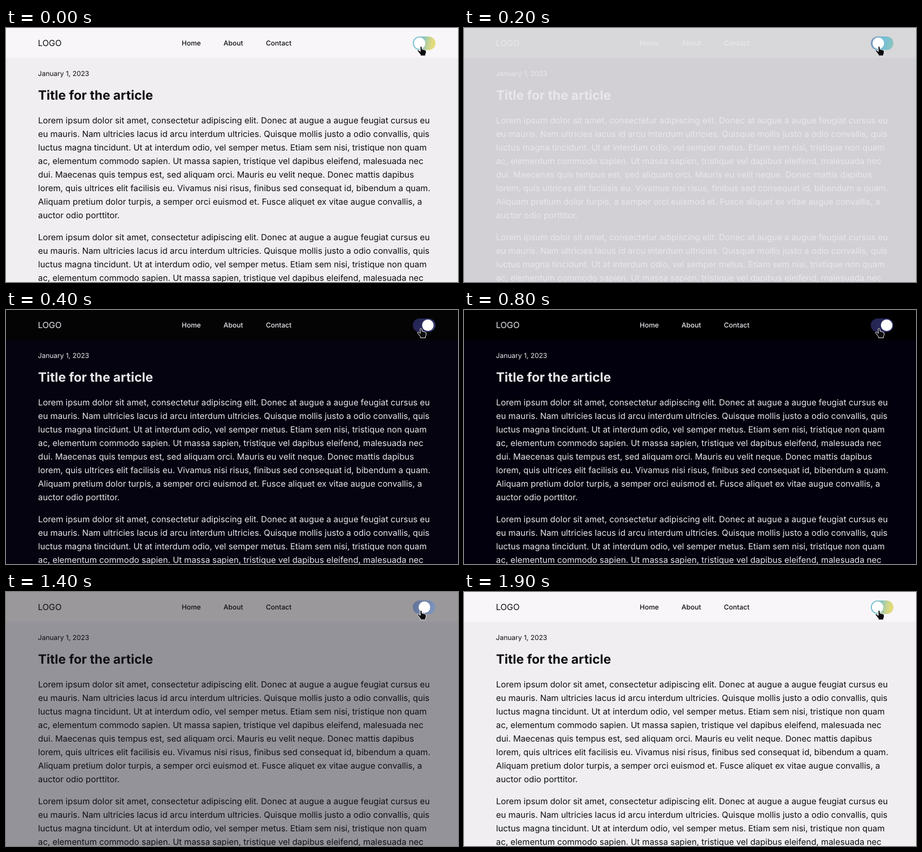
Write an HTML page that moves like this. It is 800 px wide and 450 px high and loops after 2000 ms.

```html
<!DOCTYPE html>
<html lang="en">
<head>
<meta charset="utf-8">
<title>Theme switch</title>
<style>
  html, body { margin: 0; width: 100%; height: 100%; overflow: hidden; }
  svg { display: block; width: 800px; height: 450px; }
  text {
    font: 14.96px Inter, sans-serif;
    font-optical-sizing: none;
    text-rendering: geometricPrecision;
    white-space: pre;
  }
  .small { font-size: 12px; }
  .nav { font-size: 12px; font-weight: 500; }
  .title { font-size: 22.7px; font-weight: 700; }
</style>
</head>
<body>
<svg viewBox="0 0 800 450">
  <defs>
    <linearGradient id="sky" gradientUnits="userSpaceOnUse" x1="0" y1="0" x2="196" y2="40">
      <stop offset="0" stop-color="#23244f"/>
      <stop offset=".17" stop-color="#2a2b62"/>
      <stop offset=".26" stop-color="#414b76"/>
      <stop offset=".38" stop-color="#505f80"/>
      <stop offset=".69" stop-color="#7f95bd"/>
      <stop offset=".79" stop-color="#70bed8"/>
      <stop offset=".88" stop-color="#86c4c2"/>
      <stop offset=".93" stop-color="#c6d491"/>
      <stop offset=".97" stop-color="#e2db79"/>
    </linearGradient>
    <clipPath id="pill"><rect x="720" y="15" width="40" height="24" rx="12"/></clipPath>
  </defs>

  <rect id="page" width="800" height="450"/>
  <rect id="header" width="800" height="53"/>

  <g id="copy">
    <text x="56.4" y="32">LOGO</text>
    <text class="nav" x="311" y="31">Home</text>
    <text class="nav" x="385" y="31">About</text>
    <text class="nav" x="460" y="31">Contact</text>
    <text class="small" x="56.6" y="84.5">January 1, 2023</text>
    <text class="title" x="56.7" y="127.4">Title for the article</text>
  </g>

  <g clip-path="url(#pill)">
    <rect id="strip" width="200" height="24" fill="url(#sky)"/>
  </g>
  <circle id="knob" cy="27" r="10.2" fill="#fff"/>

  <path fill="#0c0c0e" stroke="#f4f4f6" stroke-linejoin="round"
    d="M733 34.2Q733 32.6 734.4 32.6Q735.8 32.6 736 34.2L736.6 38
       Q738 37 739 38.6Q740.6 37.8 741.4 39.4Q743.4 38.8 743.6 41
       L743.5 44.2Q743 46 742.4 47V49.2H733.6V47.2Q731.4 45 730.4 43
       L728.4 40.8Q727.8 39.2 729.4 39Q731 39.2 732.4 41L733.4 41.4Z"/>
</svg>

<script>
  const LOOP = 2000, STEP = 100;
  const TO_DARK = 167, TO_LIGHT = 1301;
  const FADE = 276, SLIDE = 360;

  const light = { page: [240, 238, 241], header: [248, 246, 249] };
  const dark = { page: [1, 0, 12], header: [0, 0, 1] };

  const lines = [
    "Lorem ipsum dolor sit amet, consectetur adipiscing elit. Donec at augue a augue feugiat cursus eu",
    "eu mauris. Nam ultricies lacus id arcu interdum ultricies. Quisque mollis justo a odio convallis, quis",
    "luctus magna tincidunt. Ut at interdum odio, vel semper metus. Etiam sem nisi, tristique non quam",
    "ac, elementum commodo sapien. Ut massa sapien, tristique vel dapibus eleifend, malesuada nec",
    "dui. Maecenas quis tempus est, sed aliquam orci. Mauris eu velit neque. Donec mattis dapibus",
    "lorem, quis ultrices elit facilisis eu. Vivamus nisi risus, finibus sed consequat id, bibendum a quam.",
    "Aliquam pretium dolor turpis, a semper orci euismod et. Fusce aliquet ex vitae augue convallis, a",
    "auctor odio porttitor."
  ];

  const byId = id => document.getElementById(id);
  const [page, header, copy, strip, knob] =
    ["page", "header", "copy", "strip", "knob"].map(byId);

  function addParagraph(baseline, rows) {
    rows.forEach((row, i) => {
      const el = document.createElementNS(copy.namespaceURI, "text");
      el.setAttribute("x", 56.8);
      el.setAttribute("y", baseline + 24 * i);
      el.textContent = row;
      copy.append(el);
    });
  }
  addParagraph(169, lines);
  addParagraph(375.8, lines.slice(0, 4));

  // The CSS "ease" curve: cubic-bezier(.25, .1, .25, 1)
  function ease(x) {
    if (x <= 0) return 0;
    if (x >= 1) return 1;
    const bezier = (a, b, s) =>
      3 * a * s * (1 - s) ** 2 + 3 * b * s * s * (1 - s) + s ** 3;
    let low = 0, high = 1;
    for (let i = 0; i < 24; i++) {
      const mid = (low + high) / 2;
      if (bezier(.25, .25, mid) < x) low = mid; else high = mid;
    }
    return bezier(.1, 1, low);
  }

  const darkness = (t, duration) => t < TO_LIGHT
    ? ease((t - TO_DARK) / duration)
    : 1 - ease((t - TO_LIGHT) / duration);

  const mix = (name, p) =>
    `rgb(${light[name].map((v, i) => Math.round(v + (dark[name][i] - v) * p))})`;

  function draw(t) {
    const fade = darkness(t, FADE);
    const isDark = t >= TO_DARK && t < TO_LIGHT;
    page.setAttribute("fill", mix("page", fade));
    header.setAttribute("fill", mix("header", fade));
    copy.setAttribute("fill", isDark ? "#e9e7ec" : "#0f0f12");
    strip.setAttribute("transform", `translate(${560 + 160 * fade} 15)`);
    knob.setAttribute("cx", 732 + 16 * darkness(t, SLIDE));
  }

  // The picture advances ten times a second.
  function tick() {
    draw(Math.floor((performance.now() + 2) % LOOP / STEP) * STEP);
    requestAnimationFrame(tick);
  }
  tick();
</script>
</body>
</html>
```
